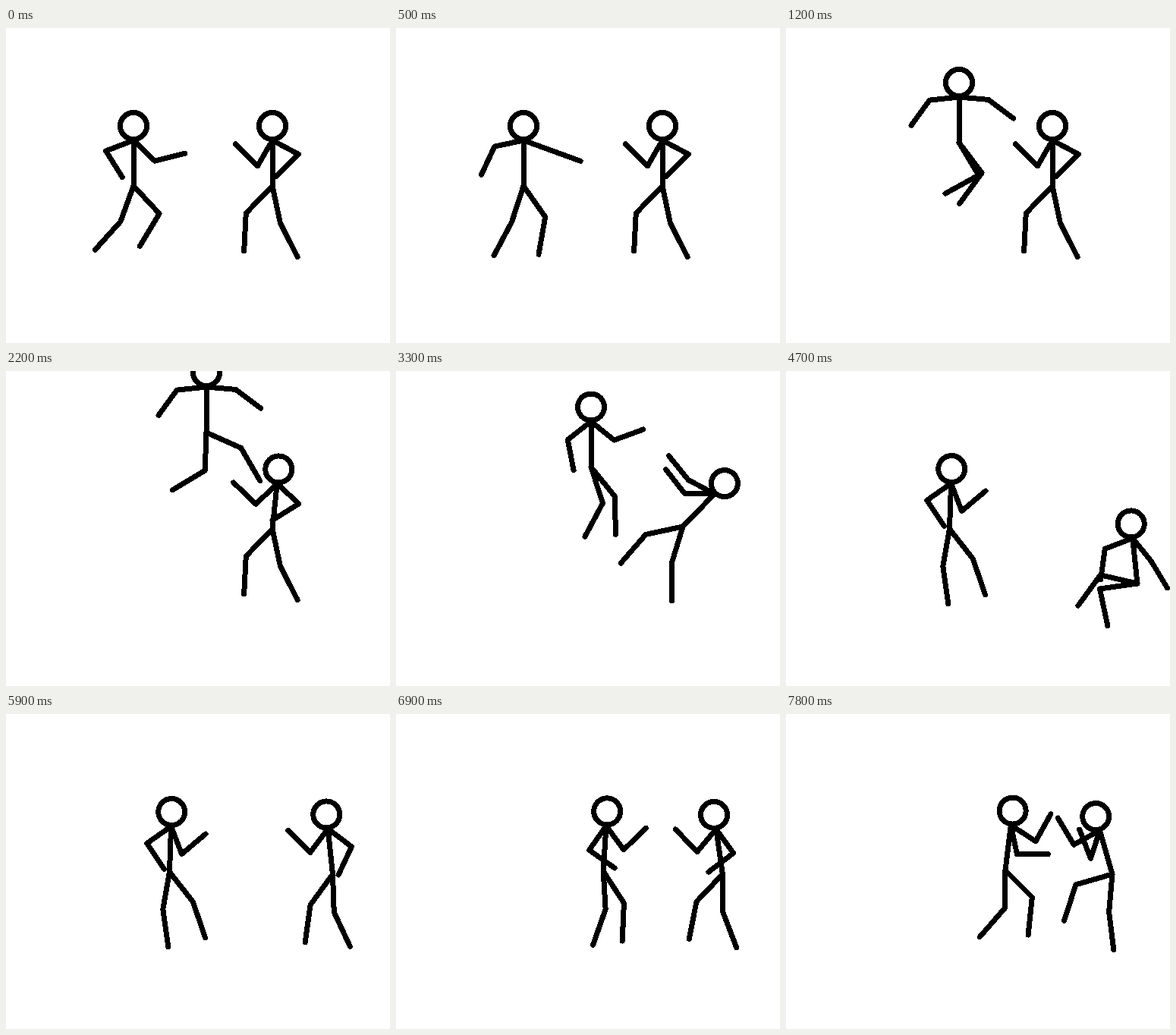
Write an HTML page that moves like this. It is 506 px wide and 415 px high and loops after 8 s.

```html
<!DOCTYPE html>
<html lang="en">
<head>
<meta charset="utf-8">
<title>Stick fight</title>
<style>
  html, body { margin: 0; width: 100%; height: 100%; overflow: hidden; background: #fff; }
  svg { display: block; width: 100%; height: 100%; }
  path { fill: none; stroke: #000; stroke-width: 7; stroke-linecap: round; stroke-linejoin: round; shape-rendering: crispEdges; }
</style>
</head>
<body>
<svg viewBox="0 0 506 415"><path id="left"/><path id="right"/></svg>
<script>
const LOOP = 8000;
const TORSO = 60, NECK = 19, HEAD = 17.5, ARM = [39, 41], LEG = [50, 50];

// Moments at which the drawing changes; it is held in between.
const steps = [0, 100, 300, 500, 900, 1200, 1500, 1800, 2000, 2200, 2500, 2800];
for (let t = 3100; t <= 7500; t += 200) steps.push(t);
steps.push(7600, 7800);

// A key pose takes whatever it leaves out from the pose before it.
// Angles in degrees, clockwise from the right; limbs: back upper, lower, front upper, lower.
function track() {
  const keys = [];
  let last = {};
  const key = (t, pose = {}) => {
    last = { ...last, ...pose };
    keys.push({ t, v: [...last.hip, last.lean, ...last.arms, ...last.legs] });
    return add;
  };
  const add = { key, keys };
  return add;
}

const attacker = track()
  .key(0, { hip: [168, 208], lean: -90, arms: [159, 58, 44, -14], legs: [110, 132, 47, 121] })
  .key(500, { arms: [168, 115, 20, 20], legs: [108, 118, 55, 100] })
  .key(900, { hip: [181, 189], arms: [174, 126, 5, 37], legs: [100, 125, 50, 120] })
  .key(1200, { hip: [228, 151], legs: [59, 151, 53, 126] })
  .key(1500, { hip: [250, 119], legs: [69, 150, 44, 106] })
  .key(2200, { hip: [264, 81], legs: [92, 149, 24, 60] })
  .key(2500, { legs: [92, 149, 24, 52] })
  .key(3300, { hip: [257, 126.5], arms: [142, 79, 39, -20], legs: [72, 118, 51, 89] })
  .key(3900, { hip: [240, 205], arms: [143, 62, 58, -32], legs: [95, 95, 50, 78] })
  .key(4300, { hip: [215.5, 208], lean: -88, arms: [145, 56, 69, -40], legs: [100, 82, 52, 71] })
  .key(5900)
  .key(6100, { hip: [213, 208], legs: [96, 82, 50, 78] })
  .key(6500, { hip: [262, 208], legs: [105, 115, 45, 95] })
  .key(7000, { hip: [276, 207], lean: -86, arms: [120, 30, 50, -45], legs: [82, 108, 60, 92] })
  .key(7600, { hip: [289, 206], lean: -83, arms: [78, -25, 48, -50], legs: [91, 131, 45, 96] })
  .key(7800, { arms: [78, 0, 33, -61] });

const defender = track()
  .key(0, { hip: [351, 208], lean: -90, arms: [28, 135, 120, 225], legs: [78, 63, 134, 93] })
  .key(2000)
  .key(2200, { lean: -84, arms: [43, 148, 136, 224] })
  .key(2500, { lean: -75, arms: [80, 168, 158, 227], legs: [78, 63, 138, 95] })
  .key(2800, { hip: [358, 208], lean: -66, arms: [120, 190, 172, 228], legs: [88, 70, 150, 112] })
  .key(3300, { hip: [378, 205], lean: -46, arms: [180, 232, 208, 231], legs: [107, 90, 168, 131] })
  .key(3800, { hip: [420, 225], lean: -50, arms: [120, 150, 185, 170], legs: [135, 88, 180, 130] })
  .key(4100, { hip: [452, 255], lean: -60, arms: [70, 90, 165, 125], legs: [172, 95, 188, 127] })
  .key(4300, { hip: [464, 281], lean: -78, arms: [48, 68, 158, 102], legs: [175, 88, 190, 126] })
  .key(4700, { hip: [463, 280], lean: -96, arms: [51, 59, 159, 98], legs: [172, 78, 193, 126] })
  .key(5300, { hip: [433, 214], arms: [32, 105, 132, 205], legs: [88, 68, 134, 97] })
  .key(5700, { hip: [430.5, 211], arms: [37, 115, 127, 225], legs: [88, 65, 126, 98] })
  .key(6700)
  .key(7600, { hip: [430, 211], lean: -106, arms: [115, 240, 140, 230], legs: [95, 83, 160, 112] })
  .key(7800, { arms: [108, 249, 151, 239], legs: [95, 83, 164, 108] });

function poseAt(keys, t) {
  const i = keys.findIndex(k => k.t > t);
  if (i < 0) return keys[keys.length - 1].v;
  const a = keys[i - 1], b = keys[i], p = (t - a.t) / (b.t - a.t);
  return a.v.map((n, j) => n + (b.v[j] - n) * p);
}

function reach([x, y], deg, len) {
  const r = deg * Math.PI / 180;
  return [x + Math.cos(r) * len, y + Math.sin(r) * len];
}

const line = points => 'M' + points.map(p => p.map(n => n.toFixed(2)).join(' ')).join('L');

function limb(root, upper, lower, size) {
  const joint = reach(root, upper, size[0]);
  return line([root, joint, reach(joint, lower, size[1])]);
}

function figure([x, y, lean, a, b, c, d, e, f, g, h]) {
  const hip = [x, y], neck = reach(hip, lean, TORSO);
  const [hx, hy] = reach(neck, lean, NECK);
  const arc = dx => `a${HEAD} ${HEAD} 0 0 1 ${dx} 0`;
  return line([hip, neck])
    + limb(neck, a, b, ARM) + limb(neck, c, d, ARM)
    + limb(hip, e, f, LEG) + limb(hip, g, h, LEG)
    + `M${hx - HEAD} ${hy}` + arc(2 * HEAD) + arc(-2 * HEAD) + 'z';
}

const left = document.getElementById('left');
const right = document.getElementById('right');
const start = performance.now();
let shown = -1;

function draw() {
  const t = Math.max(0, performance.now() - start) % LOOP;
  const held = steps.filter(s => s <= t).pop();
  if (held !== shown) {
    shown = held;
    left.setAttribute('d', figure(poseAt(attacker.keys, held)));
    right.setAttribute('d', figure(poseAt(defender.keys, held)));
  }
  requestAnimationFrame(draw);
}
draw();
</script>
</body>
</html>
```
